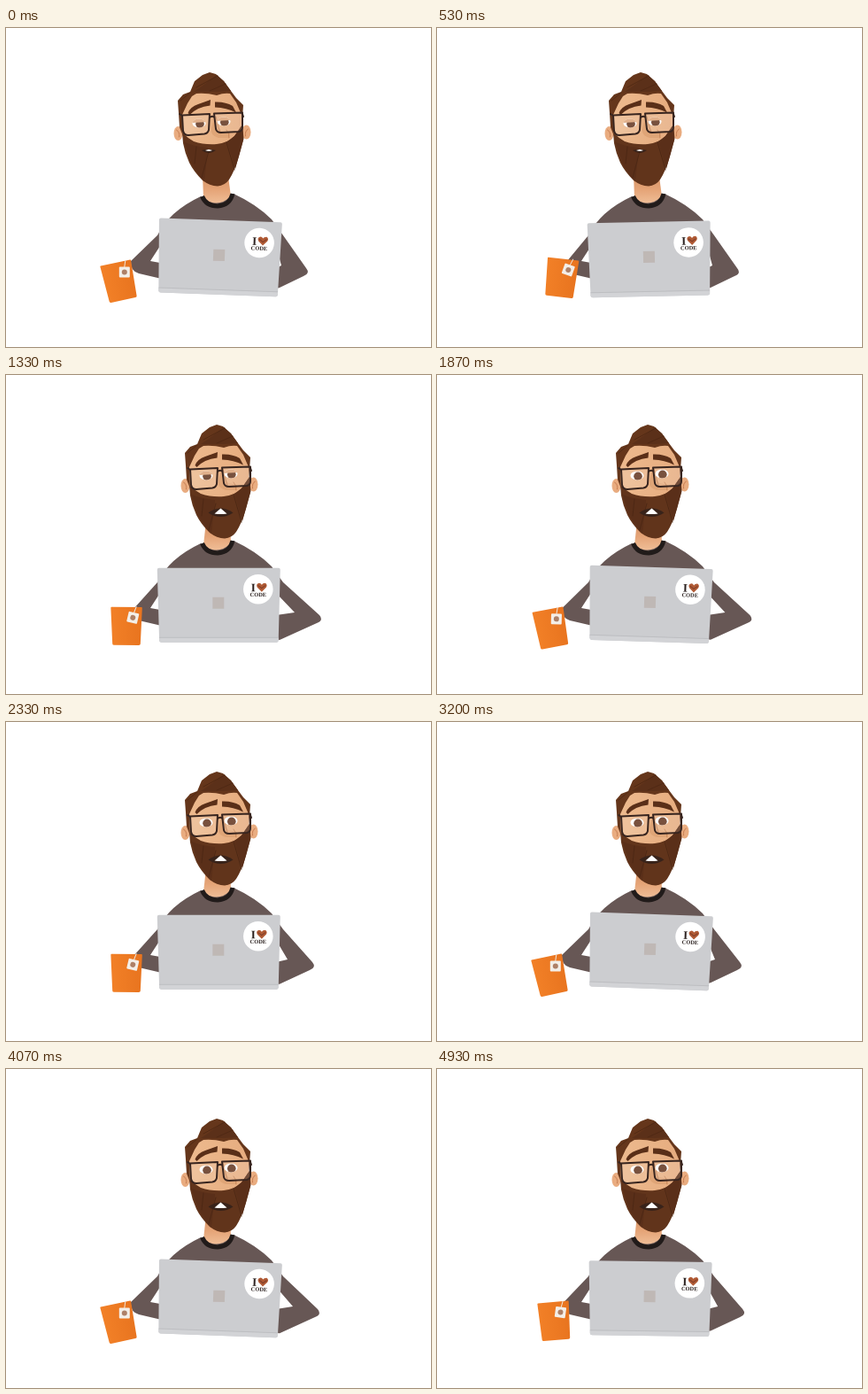
Recreate the animation shown at these times as an HTML page. Size 480x360 px, loop 5 s.

```html
<!DOCTYPE html>
<html lang="en">
<head>
<meta charset="utf-8">
<title>Coder at a laptop</title>
<style>
  html, body { margin: 0; width: 100%; height: 100%; overflow: hidden; background: #fff; }
  svg { display: block; width: 100vw; height: 100vh; }
  text { font-family: "Liberation Serif", "Noto Serif", serif; font-weight: bold; text-anchor: middle; fill: #2b211f; }
  .line { fill: none; stroke-linecap: round; stroke-linejoin: round; }
</style>
</head>
<body>
<svg viewBox="0 0 480 360">
  <defs>
    <linearGradient id="orange">
      <stop offset="0" stop-color="#f28027"/><stop offset="1" stop-color="#e8741f"/>
    </linearGradient>
    <linearGradient id="skin">
      <stop offset="0" stop-color="#edba8e"/><stop offset="1" stop-color="#e6ac7f"/>
    </linearGradient>
    <linearGradient id="throat" x2="0" y2="1">
      <stop offset="0" stop-color="#d08d60"/><stop offset=".6" stop-color="#e5a477"/><stop offset="1" stop-color="#efbd96"/>
    </linearGradient>
    <clipPath id="eyes"><ellipse cx="218" cy="107.500" rx="7.500" ry="5"/><ellipse cx="246" cy="105.500" rx="7.500" ry="5"/></clipPath>
  </defs>

  <path id="body" fill="#675755"/>
  <path id="gaps" fill="#fff"/>
  <path id="neck" fill="url(#throat)"/>
  <path class="line" d="M221.500 190Q226 201 239 201Q253 200 256 187" stroke="#211b1a" stroke-width="5" style="stroke-linecap:butt"/>

  <g id="head">
    <ellipse cx="194.500" cy="119" rx="5" ry="8" fill="#e9ac80"/>
    <ellipse cx="271.500" cy="117.500" rx="5" ry="8" fill="#e9ac80"/>
    <path class="line" d="M192.500 115q4 2 3 8M273.500 114q-4 2-3 8" stroke="#c98054"/>
    <path d="M200 122L196 112L195 96L194 82L200 75L208 72L213 60L222 53L230 50L237 52L246 60L254 71L260 79L268 87L267 101L266 116Z" fill="#65361b"/>
    <path d="M212 72L221 66L238 53L246 60L254 71L238 72Z" fill="#5b3019"/>
    <path class="line" d="M215 67L239 54M230 71L248 63M197 82L208 73" stroke="#4d2714" stroke-width=".8"/>
    <path d="M200 124L199 98L205 85L210 77L215 74Q226 73 238 76Q246 73 253 74L260 84L266 98L266 118L262 134L207 138Z" fill="url(#skin)"/>
    <path d="M236 99Q237 109 243 116L253 118L252 124L240 124Q230 121 232 113Z" fill="#dfa577"/>
    <path class="line" d="M237 100L242 119M249 115Q253 119 252 124M253 89L258 94" stroke="#bd7a4f" stroke-width=".8"/>

    <path d="M199 118Q205 124 212 128Q224 132 238 131Q250 130 258 122L267 109L268.500 125L263 145Q258 162 252 171Q247 178 239 178.500Q230 178 222 172Q212 162 207 152Q202 141 200 130Z" fill="#61341b"/>
    <path d="M202 129L207 147Q214 163 224 173L228 135Q213 134 202 129ZM250 128L258 122L267 109L268 126L259 159Z" fill="#5a2f19"/>
    <path class="line" d="M229 139L221 169M249 129L258 160M215 134L213 153" stroke="#4c2715" stroke-width=".9"/>

    <path id="lips" fill="#38231a"/>
    <path id="teeth" fill="#fff"/>

    <g clip-path="url(#eyes)">
      <path d="M208 98h48v18h-48z" fill="#fff"/>
      <circle cx="219" cy="108.300" r="4.800" fill="#62351f"/>
      <circle cx="246.800" cy="106.300" r="4.800" fill="#62351f"/>
      <path id="lids" fill="#dca478"/>
    </g>
    <path d="M205.500 96Q208 89 217 86L231 81L230.500 87.500Q216 89 207.500 98ZM236 83.500Q248 83 256 88L260 95.500Q249 90 236 89.500Z" fill="#5a2f18"/>
    <g id="glasses" class="line" stroke="#38251f" stroke-width="2">
      <g fill="#fff" fill-opacity=".14">
        <path d="M199 98.500L230 97L229 115Q228 119 224 119.500L206 121Q201 121 200 116Z"/>
        <path d="M235 96.500L267 95.500L267 112Q267 116 263 117L243 118Q238 118 237 114Z"/>
      </g>
      <path d="M230 101q3-2 5-.5M199 99l-3-2M267 97l1 3"/>
    </g>
  </g>

  <g id="mug">
    <path d="M-17 -21.500H17Q18 -21.500 17.700 -20L15.800 20Q15.700 21.500 14 21.500H-14Q-15.700 21.500 -15.800 20L-17.700 -20Q-18 -21.500 -17 -21.500Z" fill="url(#orange)"/>
  </g>
  <g id="tag">
    <path class="line" d="M0 -6L1 -13" stroke="#eee5dc"/>
    <rect x="-6" y="-6" width="12" height="12" rx="1" fill="#f3eee8"/>
    <circle r="3" fill="#ae8067"/>
  </g>

  <g id="laptop">
    <path d="M-67.500 -42H67.500Q69.500 -42 69.500 -40L67.300 40Q67 42 65 42H-65Q-67 42 -67.300 40L-69.500 -40Q-69.500 -42 -67.500 -42Z" fill="#cccdd0"/>
    <path d="M-67.400 37H67.400L67.300 40Q67 42 65 42H-65Q-67 42 -67.300 40Z" fill="#d2d3d6"/>
    <path class="line" d="M-67 36.500H67" stroke="#bdbec1"/>
    <rect x="-7" y="-9" width="13" height="13" fill="#bfb8b5"/>
    <g transform="translate(44.500 -18)">
      <circle r="16.800" fill="#fff"/>
      <text x="-5.500" y="2.500" font-size="13">I</text>
      <path d="M4 3L-1 -2Q-3 -6 1 -7Q3 -7 4 -5Q5 -7 8 -7Q11 -5 9 -2Z" fill="#b05a35"/>
      <path class="line" d="M0 -4l4 3 4-3" stroke="#7d3d28"/>
      <text y="8.300" font-size="6.400">CODE</text>
    </g>
  </g>
</svg>
<script>
const LOOP = 5000, STEPS = 75;
const $ = id => document.getElementById(id);
const set = (id, d) => $(id).setAttribute("d", d);
const place = (id, x, y, angle = 0) =>
  $(id).setAttribute("transform", `translate(${x} ${y}) rotate(${angle})`);
const mix = (a, b, k) => a + (b - a) * k;
const ease = (from, to, x) => {
  const k = Math.min(1, Math.max(0, (x - from) / (to - from)));
  return k * k * (3 - 2 * k);
};

// [step, value] keys
const SHAKE = [[0, 0], [8, 1.5], [20, 3.7], [35, 6.3], [48, 9], [61, 11], [75, 14]];
const ELBOW = [[0, 342], [4, 345], [8, 342], [12, 355], [16, 347], [20, 357], [24, 346],
  [29, 359], [35, 349], [41, 342], [48, 345], [54, 343], [61, 355], [66, 345], [70, 357], [75, 346]];

function along(keys, x) {
  const i = keys.findIndex(k => k[0] > x);
  const [x0, a] = keys[i - 1], [x1, b] = keys[i];
  return mix(a, b, (x - x0) / (x1 - x0));
}

function draw(ms) {
  const step = Math.floor((ms + 5) * STEPS / LOOP) % STEPS;
  const s = (1 - Math.cos(2 * Math.PI * along(SHAKE, step))) / 2;
  const m = ease(9, 17, step);
  const right = along(ELBOW, step), left = 141 + 6 * s;

  set("body", `M180 284L150 277Q${left - 1} 274 ${left} 263L171 234Q184 207 220 190Q239 203 257 187
    Q283 199 300 216L313 234L${right - 3} 271Q${right + 2} 277 ${right - 6} 280
    L309 ${293 + (right - 342) * .4}L295 297Z`);
  set("gaps", `M305 246L${right - 31} 268L305 271ZM174 246L163 263L174 265Z`);
  set("neck", `M${222 + 4 * m} 165L223 192Q239 204 254 190L${250 + 3 * m} 160Z`);

  place("head", 8 * m, 6 * m);
  place("glasses", m, 2 * m);
  const lid = mix(6.5, 3, ease(22, 27, step));
  set("lids", `M208 99.500h20v${lid}l-20 1zM236 97.500h20v${lid}l-20 1z`);

  const y = mix(138, 149.5, m), w = mix(8, 14, m), x = mix(229, 234.5, m);
  set("lips", `M${x - w} ${y}Q${x} ${y - 8 * m - 2} ${x + w} ${y}Q${x} ${y + 6 + 3 * m} ${x - w} ${y}Z`);
  set("teeth", `M${x - w * .5} ${y + m}L${x} ${y - 1 - 4 * m}L${x + w * .5} ${y + m}Q${x} ${y + 2} ${x - w * .5} ${y + m}Z`);

  place("mug", 128 + 12.3 * s, 286 - 4 * s, -12 + 18.5 * s);
  place("tag", 133.8 + 14.5 * s, 275.5 - 2.5 * s, 20 * s);
  place("laptop", 241 - s, 258.9 + 2 * s * s, 2 - 3.2 * s);
}

const start = performance.now();
function tick() {
  draw((performance.now() - start) % LOOP);
  requestAnimationFrame(tick);
}
tick();
</script>
</body>
</html>
```
